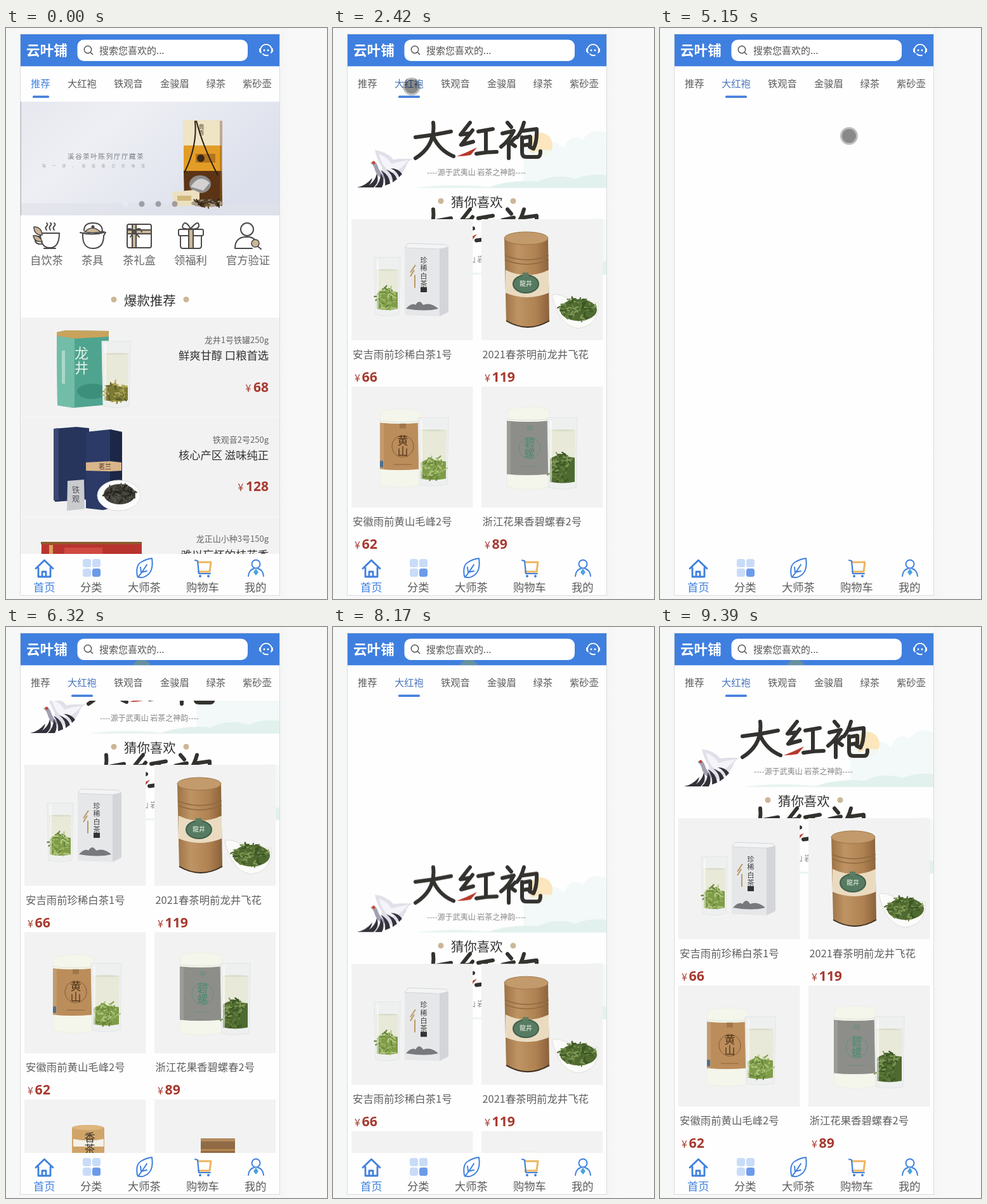
Animation of 506 by 899 pixels, one loop 9.45 s. Source, as an HTML page:

```html
<!DOCTYPE html>
<html lang="zh">
<head>
<meta charset="utf-8">
<title>Tea shop</title>
<style>
html, body { margin: 0; width: 100%; height: 100%; overflow: hidden; background: #f8f8f8; }
svg { display: block; width: 100%; height: 100%; }
text { font-family: "Noto Sans CJK SC", "Noto Sans CJK", "Noto Sans", sans-serif; white-space: pre; }
.num { font-family: "Noto Sans", "Open Sans", sans-serif; font-weight: 700; }
.line, .blue, .brush { fill: none; stroke-linecap: round; stroke-linejoin: round; }
.line { stroke: #4c4a4a; stroke-width: 2; }
.blue { stroke: #3f80de; stroke-width: 2.8; }
.brush { stroke: #34322f; stroke-width: 6; }
</style>
</head>
<body>
<script>
const LOOP = 9450, INK = '#5c5c5c', BLUE = '#3f80de', RED = '#a63a2f', TAN = '#cbb797';

let seed = 7;
const rand = () => (seed = (seed * 16807) % 2147483647) / 2147483647;

// y is the vertical middle of the glyphs
const text = (x, y, s, size, fill = INK, more = '') =>
  `<text x="${x}" y="${y + size * .37}" font-size="${size}" fill="${fill}" ${more}>${s}</text>`;
const rect = (x, y, w, h, fill, more = '') =>
  `<rect x="${x}" y="${y}" width="${w}" height="${h}" fill="${fill}" ${more}/>`;
const oval = (x, y, rx, ry, fill, more = '') =>
  `<ellipse cx="${x}" cy="${y}" rx="${rx}" ry="${ry}" fill="${fill}" ${more}/>`;
const dot = (x, y, r, fill, more) => oval(x, y, r, r, fill, more);
const path = (d, fill, more = '') => `<path d="${d}" fill="${fill}" ${more}/>`;
const stroke = (d, cls = 'line', more = '') => `<path d="${d}" class="${cls}" ${more}/>`;
const group = (x, y, body) => `<g transform="translate(${x} ${y})">${body}</g>`;
const column = (x, y, s, size, step, fill, more) =>
  [...s].map((c, i) => text(x, y + i * step, c, size, fill, 'text-anchor="middle" ' + (more || ''))).join('');

function leaves(cx, cy, rx, ry, colors, count) {
  let out = '';
  for (let i = 0; i < count; i++) {
    const a = rand() * 6.28, r = Math.sqrt(rand()), b = rand() * 6.28;
    const x = cx + Math.cos(a) * r * rx, y = cy + Math.sin(a) * r * ry;
    out += `<path d="M${x.toFixed(1)} ${y.toFixed(1)}q${(Math.cos(b) * 4).toFixed(1)} -1 ${(Math.cos(b) * 7).toFixed(1)} ${(Math.sin(b) * 5).toFixed(1)}" stroke="${colors[i % colors.length]}"/>`;
  }
  return `<g fill="none" stroke-width="2.2" stroke-linecap="round">${out}</g>`;
}

const GREEN = ['#7f9c48', '#9ab363', '#66823a', '#b3c882'];
const DARK = ['#4f6a30', '#66803f', '#3a5424', '#819a58'];
const glass = (x, y, w, h, top, colors) =>
  path(`M${x} ${y}h${w}l-2 ${h - 3}q${-w / 2 + 2} 5 ${-w + 4} 0z`, '#eef0f0', 'stroke="#e2e5e6"') +
  path(`M${x + 3} ${y + 20}h${w - 6}l-1 ${h - 32}h${8 - w}z`, '#e8e9d8') +
  oval(x + w / 2, y + 20, w / 2 - 3, 1.5, '#d9dcc8') +
  path(`M${x + 4} ${y + top + 9}q${w / 4} -9 ${w / 2} -4l${w / 2 - 8} 2v${h - top - 19}q${4 - w / 2} 4 ${8 - w} 0z`, colors[0]) +
  leaves(x + w / 2 - 1, y + (top + h - 9) / 2, w / 2 - 6, (h - 9 - top) / 2, colors, 60) +
  rect(x + 4, y + 4, 3, h - 16, '#fff', 'opacity=".5"');

/* ---------- home page ---------- */
const banner =
  rect(22, 116, 412, 179, 'url(#lav)') + rect(23, 116, 1, 179, '#aeb2bd') +
  rect(24, 276, 410, 19, '#dfe1ea', 'opacity=".6"') +
  text(97, 202, '溪谷茶叶陈列厅厅藏茶', 10.4, '#777a82', 'letter-spacing="1.75"') +
  text(57, 217, '每一饼，皆是春日的味道', 6, '#a2a4ad', 'letter-spacing="9.6"') +
  rect(279, 145, 58, 41, '#efe4c3') + rect(280, 185, 60, 41, '#e39d26') +
  path('M280 225h60l1 55-60-6z', '#5b3416') + oval(306, 246, 17, 14, '#8f8d8c') +
  path('M291 250q14-22 30-6l-10 12z', '#d3d2d0') +
  rect(299, 198, 31, 14, '#b5731c') + dot(307, 205, 6, '#3c2a18') +
  column(308, 156, '典香', 9, 9, '#5d5334') + rect(337, 146, 4, 133, '#8e5b18', 'opacity=".45"') +
  `<path d="M298 146q4 40-17 82M300 146q10 40 34 86" fill="none" stroke="#2b2118" stroke-width="2"/>` +
  path('M262 258l34-3 9 4v20l-40 2z', '#ece0bf') + rect(270, 264, 22, 8, '#d1b77a') +
  oval(317, 276, 25, 6, '#a99a86') + leaves(317, 275, 20, 4, ['#4d3a26', '#6a5233', '#2f251b'], 40) +
  dot(188, 277, 4.5, '#e9eaf0') + [214, 240, 266].map(x => dot(x, 277, 4.5, '#73747c', 'opacity=".62"')).join('');

const shortcuts =
  // cup
  stroke('M54 323h30q0 23-15 23t-15-23zM60 347h18M54 328q-8-1-8 6t11 6M64 318q-3-3 0-6t0-5M70 318q-3-4 0-7t0-4M76 318q-3-3 0-6t0-5') +
  path('M44 313q12 0 13 13q-13 0-13-13zM43 327q10-1 14 9q-12 2-14-9z', TAN, 'stroke="#4c4a4a" stroke-width="1.6"') +
  // teapot
  stroke('M121 324q-1 23 16 23t17-20l3-5-6-2-4 4M117 322q18 5 37 0M123 319q0-12 14-12t15 12') +
  path('M124 321q12-12 25 0q-12 3-25 0z', TAN, 'stroke="#4c4a4a" stroke-width="1.6"') + dot(137, 313, 2.5, '#4c4a4a') +
  // gift box
  rect(191, 309, 38, 37, '#fff', 'rx="3" stroke="#4c4a4a" stroke-width="2"') +
  rect(199, 310, 6, 35, TAN) + rect(192, 318, 36, 6, TAN) +
  stroke('M199 310v35M205 310v35M192 318h36M192 324h36M202 321q-10-10-11 0M202 321q9-10 12 0M202 321l-6 8M202 321l8 8') +
  // bow gift
  rect(272, 317, 39, 10, '#fff', 'rx="2" stroke="#4c4a4a" stroke-width="2"') +
  rect(288, 318, 7, 28, TAN) +
  stroke('M275 327v16q0 4 4 4h25q4 0 4-4v-16M288 318v28M295 318v28M291 316q-16 2-12-6t12 6q12-14 13-6t-13 6') +
  // person
  dot(380, 317, 10, '#fff', 'stroke="#4c4a4a" stroke-width="2"') +
  stroke('M361 347q0-17 16-18h7q5 1 8 4M361 347h27M396 343l6 5') +
  dot(393, 339, 6, TAN, 'stroke="#4c4a4a" stroke-width="1.6"') +
  [[38, '自饮茶'], [119, '茶具'], [184, '茶礼盒'], [265, '领福利'], [347, '官方验证']]
    .map(([x, s]) => text(x, 366, s, 17.3, '#666')).join('');

const heading = (y, s) =>
  dot(170, y - 1.5, 4.5, TAN) + dot(284, y - 1.5, 4.5, TAN) + text(186, y, s, 20.4, '#333');

const tin = path('M80 479l14-3 68 1v116l-56 5-25-4z', '#4fa48f') + path('M80 479l14-3 68 1v9l-54 3-28-4z', '#c9a35c') +
  path('M80 485l28 4v109l-27-4z', '#72bda8') + column(119, 512, '龙井', 22, 23, '#e6f3ea', 'font-weight="300"') +
  oval(136, 572, 24, 12, '#3c8f7a') + rect(88, 508, 5, 52, '#a9d9c9') +
  glass(151, 493, 45, 105, 66, ['#7c7a35', '#9b9645', '#5d5d28', '#b5a95c']);
const blueBoxes = path('M75 631l36-3 20 2v112l-54 4z', '#27345c') + path('M75 631l8-1v113l-8 1z', '#3a4872') +
  path('M126 636l38-4 19 4v116l-30 7-27-3z', '#2b3a67') + path('M164 632l19 4v116l-19 5z', '#1c2747') +
  path('M126 684l38-2 18 2v13l-18 1-38-1z', '#d9b58a') + text(146, 690, '茗兰', 10, '#4d3622') +
  path('M97 713l26-2 1 46-28 3z', '#c9cbce') + column(110, 728, '铁观', 12, 14, '#4d4f52') +
  oval(178, 736, 34, 24, '#fbfbfb', 'stroke="#dcdcdc"') + oval(179, 734, 25, 16, '#44423b') +
  leaves(179, 734, 22, 14, ['#33342b', '#56554a', '#24251f'], 60);
const redBox = path('M56 812l158-2v60H55z', '#b9342f') + rect(55, 809, 159, 4, '#8e5a2c') +
  rect(68, 814, 6, 20, '#d7a35a') + rect(92, 818, 60, 20, '#cf4a41');

const items = [['龙井1号铁罐250g', '鲜爽甘醇 口粮首选', 68], ['铁观音2号250g', '核心产区 滋味纯正', 128], ['龙正山小种3号150g', '难以忘怀的桂花香', 98]]
  .map(([name, note, price], i) => {
    const y = 491 + i * 156.7, end = 'text-anchor="end"';
    return text(414, y, name, 13, '#666', end) + text(414, y + 25, note, 17.3, '#333', end) +
      text(414, y + 74, `<tspan font-size="16">¥ </tspan><tspan class="num">${price}</tspan>`, 21, RED, end) +
      rect(23, y + 121, 408, 1.5, '#f7f7f7');
  }).join('');

const home = rect(23, 116, 408, 712, '#fefefe') + `<g clip-path="url(#slot)"><g id="banner">${banner}</g></g>` +
  shortcuts + heading(429, '爆款推荐') + rect(23, 456, 408, 372, '#f2f2f2') + tin + blueBoxes + redBox + items;

/* ---------- category page ---------- */
// hand-brushed 大 红 袍, each in a 66 px box
const lettering =
  group(127, 146, stroke('M3 26q28-3 56-9M31 3q4 36-28 56M31 25q10 22 32 31', 'brush')) +
  group(196, 146, stroke('M20 3L5 22l13-2M24 15L6 38l19-5M33 17l23-4M45 16v34M30 52q16-3 32-3', 'brush')) +
  group(263, 146, stroke('M12 3l6 7M4 20l18-4Q14 32 2 41M14 30v29M24 27l-6 6M17 35l7 5', 'brush') +
    stroke('M38 3Q34 18 27 26M36 16l22-3q1 20-5 31l-6-3M36 27l12-2v12l-12 2M35 26v24q0 7 7 7h17q5 0 5-9', 'brush'));
const feathers = 'M38 251q13-2 24-15q-2 11-10 15zM50 251q16-7 19-22q5 13-5 22zM66 251q10-10 9-22q8 11 2 22zM82 248q2-14-7-24q14 7 15 21zM94 243q1-12-10-20q13 4 17 15zM104 235q-2-9-13-14q12 0 18 9z';
const scenery =
  path('M300 190q14-12 30 0q16-20 34 0q8-26 30-14q12-20 37-10v86H300z', '#f3f9f9') +
  dot(327, 184, 19, '#fbe6bd') + path('M310 200q20-14 44-4q16-14 34 0l43-12v52H310z', '#f3f9f8', 'opacity=".85"') +
  path('M240 252q40-14 82-10q30-14 60-4q24-10 49-6v20z', '#e2f1ee') + path('M130 252q60-9 130 0z', '#e9f4f2') +
  lettering + path('M195 202q16-6 32-14l-10 12q-10 2-22 2z', '#b8382c') +
  text(148, 228, '----源于武夷山 岩茶之神韵----', 12, '#858585') +
  path('M66 192q20 3 29 15q12-2 30-1q-9 5-10 13q-8 16-26 21q-10 6-21 6q10-14 9-27q-8-12-11-27z', '#e1dfe9') +
  path('M72 198q14 5 20 16q14-4 27-6q-12 16-28 20q-14-10-19-30z', '#f5f4f8') +
  path('M59 212q8-4 11 4q4 14 14 18l-4 4q-12-4-15-18q-2-5-6-8z', '#a3a0b3') + dot(64, 212, 2.5, '#c2463c') +
  path(feathers, '#33323a');

const kraft = '#bb8d5b';
const canister = (x, y, w, h, label, ly, lh) =>
  path(`M${x + 2} ${y + 4}q${w / 2} -8 ${w - 4} 0l2 14v${h - 22}q${-w / 2} 8 ${-w} 0v${22 - h}z`, '#f4f6ec', 'stroke="#eceee6"') +
  path(`M${x} ${y + 19}q${w / 2} 4 ${w} 0`, 'none', 'stroke="#dfe2d6"') +
  path(`M${x} ${ly}q${w / 2} 3 ${w - 3} 0v${lh}q${-w / 2} 3 ${3 - w} 0z`, label) + rect(x, ly + 1, 6, lh, '#fff', 'opacity=".12"');
const medal = (x, y, s, fill) => dot(x, y, 17, 'none', `stroke="${fill}" opacity=".55"`) +
  column(x, y - 9, s, 17, 17, fill, 'font-weight="500"') + rect(x - 14, y + 28, 28, 1.5, fill, 'opacity=".3"') + rect(x - 5, y - 36, 10, 8, fill, 'opacity=".25"');

const goods = [
  ['安吉雨前珍稀白茶1号', 66,
    glass(36, 60, 41, 93, 48, GREEN) + path('M84 45l6-7 58 2 5 4v102l-14 7-55-2z', '#e6e7e9') +
    path('M84 45l6-7 58 2 5 4-14 3z', '#f3f4f5', 'stroke="#d5d6da"') + path('M139 47l14-3v102l-14 7z', '#d3d5d9') +
    path('M86 141q9-10 15-6q6-10 12 0q12-5 24 6q-20 5-51 0z', '#77797c') +
    column(114, 65, '珍稀白茶', 11, 12.3, '#3f3f3f') + rect(109, 107, 10, 8, '#333') +
    `<path d="M101 72l-8 12M99 80l-6 10M100 88v20" stroke="#b99b63" stroke-width="2"/>`],
  ['2021春茶明前龙井飞花', 119,
    path('M36 30h69l2 130q-34 20-68 0z', 'url(#gold)') + oval(70.5, 30, 34.5, 10, '#c29a6b', 'stroke="#a07546"') +
    path('M37 57q34 14 69 0M37 64q34 14 69 0', 'none', 'stroke="#8f6a40" stroke-width="1.4"') +
    path('M38 80q34 16 68 0v36q-34 14-68 0z', '#eadbc0') + path('M39 160q34 20 68 0', 'none', 'stroke="#3b2c1d" stroke-width="2"') +
    oval(70, 102, 20, 14, '#567b62', 'stroke="#3f5f4c" stroke-width="2"') + text(60, 101, '龍井', 10, '#eef3e8') +
    rect(65, 84, 9, 7, '#5c7d62') +
    path('M111 120q6-4 20 2q28 12 53 9q2 37-32 41q-30-4-41-52z', '#fbfbf9', 'stroke="#dededa"') + oval(153, 143, 29, 17, '#4f6a30') +
    leaves(151, 142, 28, 18, DARK, 90)],
  ['安徽雨前黄山毛峰2号', 62,
    canister(45, 35, 66, 124, kraft, 57, 73) + medal(81, 94, '黄山', '#4f3219') + rect(45, 117, 5, 10, '#4d6f8c') + glass(105, 49, 48, 108, 62, GREEN)],
  ['浙江花果香碧螺春2号', 89,
    canister(40, 32, 68, 130, '#8d8e8a', 54, 84) + medal(76, 97, '碧螺', '#4a8a72') + glass(104, 49, 47, 113, 56, DARK)],
  ['福建岩香大红袍茶3号', 78,
    path('M75 44q25-8 51 0v112q-25 8-51 0z', '#d0a469') + oval(100, 44, 25, 4, '#dfb67c') + path('M77 62q25 5 48 0v12H77z', '#f4f1e8') +
    column(103, 60, '香茶', 17, 18, '#3a352c')],
  ['武夷山岩茶肉桂香3号', 96, rect(73, 61, 54, 100, '#8f6a45') + rect(73, 61, 54, 5, '#b18a5e') + rect(73, 78, 54, 3, '#b98850')]
].map(([name, price, art], i) => group(i % 2 ? 234 : 29, 301 + (i >> 1) * 263.5,
  rect(0, 0, 191.3, 190.5, '#f2f2f2') + art + text(i % 2 ? 1.5 : 2, 212.5, name, 16.4, '#5f5f5f') +
  text(5, 250, '¥', 16, RED) + text(16.5, 248, price, 21.3, RED, 'class="num"'))).join('');

const category = `<g id="scroll"><g clip-path="url(#strip)">${scenery}</g>
  <g transform="translate(0 136.5)" clip-path="url(#strip)">${scenery}</g>${heading(274, '猜你喜欢')}${goods}</g>`;

/* ---------- fixed chrome ---------- */
const header = rect(23, 10, 408, 50.5, '#3f7fdf') +
  `<g clip-path="url(#head)"><circle id="trace" cx="214" cy="66" r="15"/></g>` +
  text(32, 35, '云叶铺', 21.6, '#fff', 'font-weight="900"') +
  rect(112.5, 18.500, 268.5, 33.5, '#fff', 'rx="10"') +
  `<circle cx="129" cy="34" r="5.7" fill="none" stroke="#555" stroke-width="1.5"/><path d="M133 38l4 4" stroke="#555" stroke-width="1.6"/>` +
  text(147, 35.5, '搜索您喜欢的...', 15, '#555') +
  `<path d="M402 39a9 9 0 1 1 16 0M413 43q-5 1-8-2M400 33v4M420 33v4" fill="none" stroke="#fff" stroke-width="1.8" stroke-linecap="round"/>` +
  dot(407, 35, 1.5, '#fff') + dot(413, 35, 1.5, '#fff');

const tabs = rect(23, 60.5, 408, 55.5, '#fefefe') +
  [[39, '推荐', 'first'], [97, '大红袍', 'second'], [170, '铁观音'], [243, '金骏眉'], [315.5, '绿茶'], [373, '紫砂壶']]
    .map(([x, s, id]) => text(x, 87.5, s, 15.3, INK, id ? `id="${id}"` : '')).join('') +
  `<rect id="bar" x="0" y="106.5" width="26" height="3.4" rx="1.5" fill="#437fdc"/>`;

const footer = rect(23, 828, 408, 65, '#fefefe') +
  stroke('M47 851l13.5-13 13.5 13M51 850v14h19v-14M57 864v-8h6v8', 'blue') +
  rect(121, 836, 13, 13, '#c8dcf8', 'rx="3.5"') + rect(136, 836, 13, 13, '#c8dcf8', 'rx="3.5"') +
  rect(121, 851, 13, 13, '#c8dcf8', 'rx="3.5"') + rect(136, 851, 13, 13, '#6c9bea', 'rx="3.5"') +
  stroke('M230 835q3 20-8 27q-9 6-15 1q-3-17 6-22q8-5 17-6zM208 865q8-10 14-20M213 857l-1-8M213 857l9-2', 'blue', 'style="stroke-width:2"') +
  stroke('M303 841h20l-2 15h-18', 'blue', 'style="stroke:#eeb55f;stroke-width:3"') +
  stroke('M298 838l4 1 2 20h18', 'blue', 'style="stroke-width:2.2"') + dot(306, 863, 2, BLUE) + dot(319, 863, 2, BLUE) +
  `<circle cx="394" cy="844" r="6.5" class="blue" style="stroke-width:2"/>` +
  stroke('M382 863q1-10 9-12M406 863q-1-10-9-12', 'blue', 'style="stroke-width:2"') + path('M394 851l4 6-4 5-4-5z', '#4aa3e0') +
  [[43, '首页', BLUE], [117, '分类'], [192, '大师茶'], [284, '购物车'], [376, '我的']]
    .map(([x, s, c]) => text(x, 881, s, 17.3, c || INK)).join('');

document.body.innerHTML = `<svg viewBox="0 0 506 899">
<defs>
  <linearGradient id="lav" x2="1" y2=".5"><stop stop-color="#e6e8ef"/><stop offset=".35" stop-color="#eeeff4"/><stop offset="1" stop-color="#dce0ec"/></linearGradient>
  <linearGradient id="gold"><stop stop-color="#9d7346"/><stop offset=".3" stop-color="#bf9464"/><stop offset=".7" stop-color="#b08252"/><stop offset="1" stop-color="#8a623a"/></linearGradient>
  <linearGradient id="shade"><stop stop-color="#f4f5f5"/><stop offset="1" stop-color="#f8f8f8"/></linearGradient>
  <clipPath id="view"><rect x="23" y="116" width="408" height="712"/></clipPath>
  <clipPath id="slot"><rect x="23" y="116" width="408" height="179"/></clipPath>
  <clipPath id="strip"><rect x="23" y="116" width="408" height="136"/></clipPath>
  <clipPath id="head"><rect x="23" y="10" width="408" height="50"/></clipPath>
</defs>
${rect(0, 0, 506, 899, '#f8f8f8')}${rect(0, 0, 23, 899, '#f6f8f8')}${rect(432, 0, 18, 899, 'url(#shade)')}
${rect(22.5, 9.5, 409, 884, '#fefefe', 'stroke="#dcdcdc"')}
<g clip-path="url(#view)"><g id="pages">${home}${group(408, 0, category)}</g></g>
${header}${tabs}${footer}
<g id="touch"><g id="finger"><circle r="14" fill="#000" opacity=".25"/><circle r="11" fill="#000" opacity=".28"/></g></g></svg>`;

/* ---------- motion ---------- */
const sheet = document.head.appendChild(document.createElement('style'));
function play(id, timing, steps) {
  const frames = steps.map(([ms, css, ease]) =>
    `${(ms / LOOP * 100).toFixed(4)}%{${css}${ease ? `;animation-timing-function:${ease}` : ''}}`).join('');
  sheet.textContent += `@keyframes ${id}{${frames}}#${id}{animation:${id} ${LOOP}ms ${timing} infinite}`;
}
const move = (x, y) => `transform:translate(${x}px,${y}px)`;

play('banner', 'step-end', [[0, move(0, 0)], [1070, move(-1, 0)], [LOOP, move(-1, 0)]]);
play('pages', 'linear', [[0, move(0, 0)], [1830, move(0, 0), 'ease-out'], [2350, move(-408, 0)], [LOOP, move(-408, 0)]]);
play('first', 'step-end', [[0, 'fill:' + BLUE], [1800, 'fill:' + INK], [LOOP, 'fill:' + INK]]);
play('second', 'step-end', [[0, 'fill:' + INK], [1800, 'fill:#4a76bd'], [LOOP, 'fill:#4a76bd']]);
play('bar', 'linear', [[0, move(42, 0) + ';width:26px'], [1800, move(42, 0) + ';width:26px', 'ease-out'],
  [2150, move(103, 0) + ';width:34px'], [LOOP, move(103, 0) + ';width:34px']]);
play('scroll', 'linear', [
  [0, 0], [3650, 0, 'ease-out'], [3850, 540], [4050, 540, 'ease-in-out'], [4700, 720],
  [5350, 720, 'cubic-bezier(.2,.7,.3,1)'], [6250, -84], [6330, -84, 'ease-in'], [6900, 720],
  [8040, 720, 'cubic-bezier(.25,.6,.4,1)'], [8480, -62, 'ease-in-out'], [8630, -49, 'cubic-bezier(.2,.5,.4,1)'], [9390, 0], [LOOP, 0]
].map(([ms, y, ease]) => [ms, move(0, y), ease]));
play('touch', 'linear', [
  [0, 459, 915], [70, 459, 890, 'ease-out'], [800, 124, 112], [1000, 124, 112], [1140, 124, 109], [1800, 124, 109], [2100, 124, 92],
  [2640, 124, 92, 'ease-in-out'], [3580, 365, 431], [3650, 365, 431, 'ease-out'], [3850, 350, 841], [4050, 350, 841],
  [4300, 340, 885], [4750, 322, 540], [4940, 315, 617], [5010, 315, 617], [5140, 298, 170], [5350, 298, 170], [5500, 214, 60],
  [6330, 214, 130, 'ease-in'], [6880, 200, 868], [7080, 196, 868, 'ease-in-out'], [7970, 419, 52], [LOOP, 419, 52]
].map(([ms, x, y, ease]) => [ms, move(x, y), ease]));
play('finger', 'step-end', [[0, 0], [70, 1], [5500, 0], [6390, 1], [6880, 0], [7080, 1], [7970, 0], [LOOP, 0]]
  .map(([ms, o]) => [ms, 'opacity:' + o]));
play('trace', 'step-end', [[0, 'fill:#3f7fdf'], [5500, 'fill:#6690a0'], [LOOP, 'fill:#6690a0']]);
</script>
</body>
</html>
```
